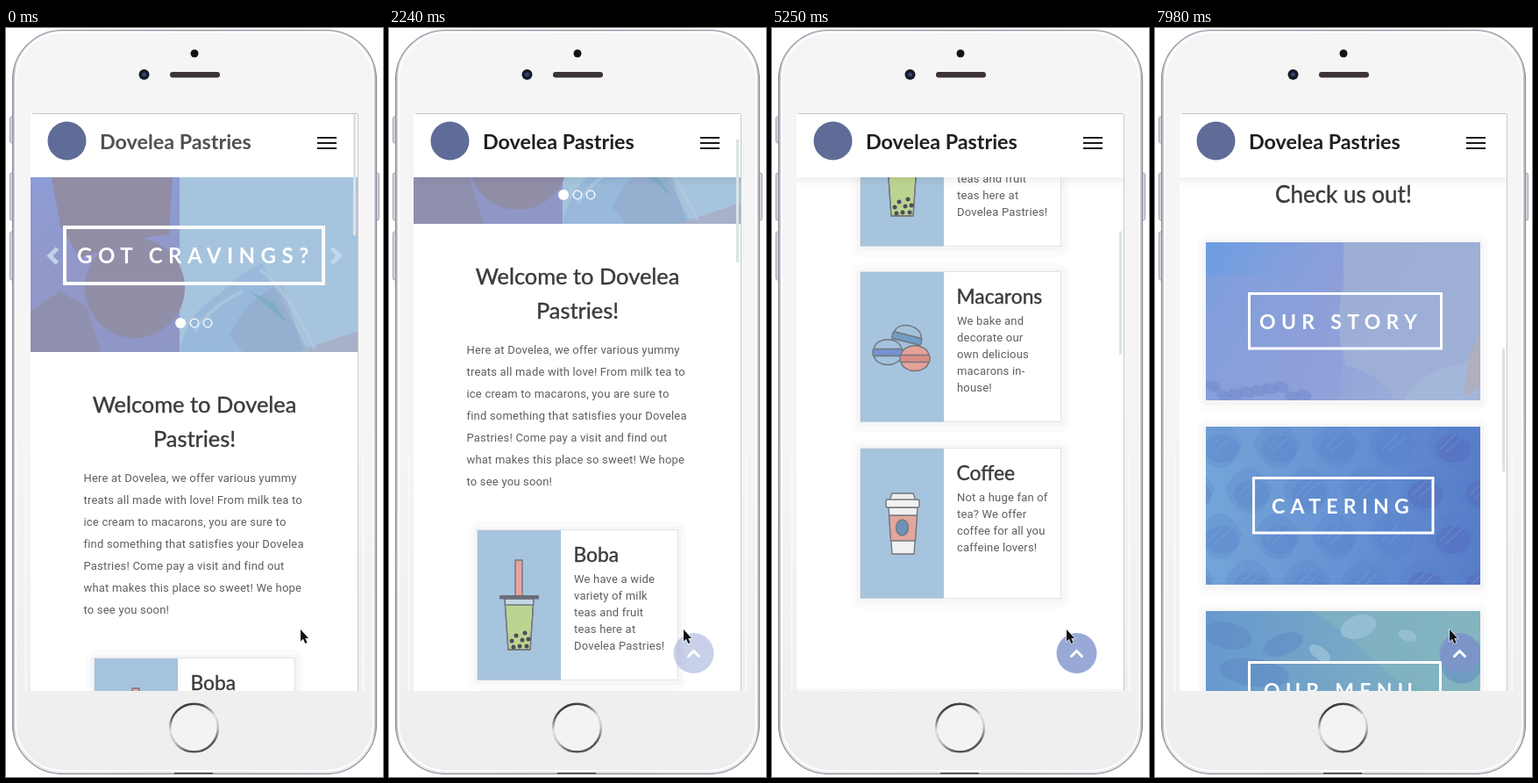
An HTML page for the animation above (8 s loop, 430 px wide and 853 px high).

```html
<!DOCTYPE html>
<html lang="en">
<head>
<meta charset="utf-8">
<title>Dessert shop on a phone</title>
<style>
  html, body { margin: 0; width: 100%; height: 100%; overflow: hidden; background: #fff; }
  svg { display: block; width: 430px; height: 853px; }
  text { white-space: pre; }
  .title { font-family: Lato, sans-serif; fill: #3a3a3f; }
  .medium { stroke: #3a3a3f; stroke-width: .4; }
  .body { font: 13px Roboto, sans-serif; letter-spacing: .2px; fill: #5e5e63; }
  .caps { font-family: Lato, sans-serif; font-weight: 700; fill: #fff; }
  .ink { stroke: #74767e; stroke-width: 1.4; stroke-linejoin: round; }
</style>
</head>
<body>
<svg viewBox="0 0 430 853">
  <defs>
    <linearGradient id="rim" x2="1" y2="0">
      <stop stop-color="#b4b4be"/><stop offset=".012" stop-color="#e6e6ec"/>
      <stop offset=".5" stop-color="#d6d6dc"/>
      <stop offset=".988" stop-color="#e6e6ec"/><stop offset="1" stop-color="#b4b4be"/>
    </linearGradient>
    <linearGradient id="face" x2="0" y2="1">
      <stop stop-color="#f5f5f5"/><stop offset=".5" stop-color="#f5f5f6"/><stop offset="1" stop-color="#eeeeee"/>
    </linearGradient>
    <linearGradient id="ring" x2=".35" y2="1">
      <stop stop-color="#222"/><stop offset=".25" stop-color="#555"/><stop offset=".5" stop-color="#e2e2e2"/>
      <stop offset=".75" stop-color="#c4c4c4"/><stop offset="1" stop-color="#555"/>
    </linearGradient>
    <linearGradient id="wall" x2="0" y2="1">
      <stop stop-color="#8c9cd6"/><stop offset=".5" stop-color="#9398c8"/><stop offset="1" stop-color="#8f97c6"/>
    </linearGradient>
    <linearGradient id="storyTone" x2="1" y2=".35">
      <stop stop-color="#6b9de2"/><stop offset=".3" stop-color="#839fdc"/>
      <stop offset=".52" stop-color="#8e9fd9"/><stop offset="1" stop-color="#9bb0d9"/>
    </linearGradient>
    <linearGradient id="cateringTone" x2="1" y2="0">
      <stop stop-color="#74a5d8"/><stop offset=".5" stop-color="#6792d3"/><stop offset="1" stop-color="#587dc9"/>
    </linearGradient>
    <linearGradient id="menuTone" x2="1" y2="0">
      <stop stop-color="#6799cf"/><stop offset=".5" stop-color="#76a7c5"/><stop offset="1" stop-color="#82b4bf"/>
    </linearGradient>
    <linearGradient id="shade" x2="0" y2="1">
      <stop stop-color="#000" stop-opacity=".055"/><stop offset="1" stop-color="#000" stop-opacity="0"/>
    </linearGradient>
    <clipPath id="screen"><rect x="28" y="97" width="374" height="658"/></clipPath>
    <clipPath id="heroClip"><rect x="28" y="170" width="374" height="199"/></clipPath>
    <clipPath id="tileClip"><rect width="313" height="180"/></clipPath>
  </defs>

  <g fill="#d9d9df" stroke="#a4a4b0">
    <rect x="4.500" y="101" width="5" height="30" rx="2"/>
    <rect x="4.500" y="165" width="5" height="54" rx="2"/>
    <rect x="4.500" y="232" width="5" height="55" rx="2"/>
    <rect x="420.500" y="165" width="5" height="54" rx="2"/>
  </g>
  <rect x="7.500" y="2.500" width="415" height="847" rx="57" fill="url(#rim)" stroke="#8f8f9c" stroke-width="1.200"/>
  <rect x="11" y="5" width="408" height="841" rx="54" fill="url(#face)" stroke="#fff" stroke-width="2"/>
  <path d="M60 849.500H370" stroke="#85858d"/>
  <path d="M192 849H236" stroke="#55555c" stroke-width="2"/>
  <path d="M22.500 485V755M407.500 485V755" stroke="#fafafa" stroke-width="2"/>
  <circle cx="215" cy="29" r="4.500" fill="#171315"/>
  <circle cx="157.500" cy="53" r="6" fill="#151a2b"/><circle cx="157.500" cy="53" r="2.500" fill="#35456b"/>
  <rect x="187" y="50" width="57" height="6.500" rx="3.200" fill="#3b3334"/>
  <circle cx="214.500" cy="797" r="27.300" fill="#f3f3f3" stroke="url(#ring)" stroke-width="2.600"/>

  <g clip-path="url(#screen)">
    <rect x="28" y="97" width="374" height="658" fill="#fff"/>
    <g id="page"></g>
    <rect id="shadow" x="28" y="170" width="374" height="11" fill="url(#shade)"/>
    <rect x="28" y="97" width="374" height="73" fill="#fff"/>
    <circle cx="69.500" cy="128.500" r="22" fill="#5f6c97"/>
    <text id="brand" class="title" x="107" y="138" font-size="23.300" font-weight="700">Dovelea Pastries</text>
    <path d="M355 125H377M355 131H377M355 137H377" stroke="#151515" stroke-width="2"/>
    <rect id="thumb" x="396" width="3" height="141" rx="1.500" fill="#d9e5e6"/>
    <path d="M30 97.500H401" stroke="#c6c6c8"/>
    <path d="M401.500 98V755" stroke="#c9c9cb"/>
    <g id="upButton">
      <circle cx="347.500" cy="712" r="23" fill="#7f94cc" opacity=".8"/>
      <path d="M341.500 715.500L347.500 709.500L353.500 715.500" fill="none" stroke="#fff" stroke-width="3" stroke-linecap="round"/>
    </g>
    <path d="M336 685V698.500L339 695.800L341.300 701L343.500 700L341.300 695H345Z" fill="#111" stroke="#fff" stroke-width="1.200" paint-order="stroke"/>
  </g>
</svg>
<script>
const byId = id => document.getElementById(id);
const range = n => [...Array(n).keys()];
const lines = (rows, x, y, step) =>
  rows.map((row, i) => `<text class="body" x="${x}" y="${y + i * step}">${row}</text>`).join('');
const heading = (text, y, size) =>
  `<text class="title medium" x="215" y="${y}" font-size="${size}" text-anchor="middle">${text}</text>`;
const halo = (w, h) =>
  `<rect x="-9" y="-9" width="${w + 18}" height="${h + 22}" rx="14" fill="#fbfbfb"/>
   <rect x="-4" y="-3" width="${w + 8}" height="${h + 9}" rx="5" fill="#f6f6f7"/>`;
const ellipses = (list, fill, opacity) => list.map(([x, y, rx, ry, turn = 0]) =>
  `<ellipse cx="${x}" cy="${y}" rx="${rx}" ry="${ry}" transform="rotate(${turn} ${x} ${y})" fill="${fill}" opacity="${opacity}"/>`).join('');

function hero() {
  return `<g clip-path="url(#heroClip)">
    <rect x="28" y="170" width="374" height="199" fill="#a6c4dd"/>
    <path d="M28 170H198V369H28Z" fill="url(#wall)"/>
    <path d="M52 170H190L186 235L150 240L84 262L62 225Z" fill="#918da4"/>
    <path d="M28 322L62 300L92 318L108 369H28Z" fill="#8f90ad"/>
    <path d="M198 369Q205 325 245 302Q265 280 292 268L345 369Z" fill="#98b9da"/>
    <path d="M255 350Q275 305 315 292L340 369H270Z" fill="#91a0c4" opacity=".4"/>
    <path d="M330 369L402 345V369Z" fill="#a7b1c9"/>
    <path d="M278 300L322 338L305 312Z" fill="#77aebd" opacity=".7"/>
    <path d="M215 345Q235 315 270 300M290 275Q322 300 352 365" fill="none" stroke="#b5cbe2" stroke-width="4" opacity=".6"/>
    <circle cx="147" cy="296" r="57" fill="#918ea8"/>
    <rect x="395" y="187" width="5" height="48" fill="#c3c7d2" opacity=".7"/>
  </g>
  <rect x="67" y="227" width="295" height="64" fill="none" stroke="#fff" stroke-width="4"/>
  <text class="caps" x="81" y="268" font-size="24" letter-spacing="6.5">GOT CRAVINGS?</text>
  <g fill="none" stroke="#c6ddef" stroke-width="5" opacity=".85">
    <path d="M58.500 251L50 259.500L58.500 268"/><path d="M371.500 251L380 259.500L371.500 268"/>
  </g>
  <circle cx="199" cy="336" r="6" fill="#fff"/>
  <g fill="none" stroke="#fff" stroke-width="1.300"><circle cx="215" cy="336" r="4.800"/><circle cx="230" cy="336" r="4.800"/></g>`;
}

function boba() {
  const pearls = [[55, 118], [45, 121], [52, 126], [59, 125], [40, 127], [42, 134], [49, 133], [57, 133]];
  return `<path class="ink" d="M32 79H65L61 137H36Z" fill="#c5d8e5"/>
    <path d="M33.500 86H63.500L60 136H37Z" fill="#bcd492"/>
    <path class="ink" d="M33 86H64M32 79L36 137H61L65 79" fill="none"/>
    <rect class="ink" x="44" y="35" width="8" height="41" fill="#e5a49c"/>
    <rect x="26" y="75" width="45" height="4.500" rx="1" fill="#686d77"/>
    ${ellipses(pearls.map(([x, y]) => [x, y, 2.5, 2.5]), '#4d4d59', 1)}`;
}

const macaron = (x, y, turn, shell, filling) =>
  `<g class="ink" stroke-width="1.200" transform="translate(${x} ${y}) rotate(${turn})" fill="${shell}">
    <path d="M-16 -3C-14 -18 14 -18 16 -3Z"/><path d="M-16 4C-13 18 13 18 16 4Z"/>
    <rect x="-17" y="-3.500" width="34" height="8" rx="2" fill="${filling}"/></g>`;

const macarons = () =>
  macaron(54, 76, 14, '#a3c2da', '#6f9cc4') +
  macaron(32, 92, 0, '#a3c2dc', '#7593d2') +
  macaron(63, 99, 0, '#e5a298', '#d88d86');

const coffee = () =>
  `<g class="ink"><path d="M33 68L37 121H62L66 68Z" fill="#f0f0f1"/>
    <path d="M33.500 77H65.500L63.500 106H35.500Z" fill="#e3a69c"/>
    <path d="M37 52H61L64 60H34Z" fill="#ededee"/>
    <rect x="30" y="59" width="38" height="9" rx="2" fill="#f2f2f3"/>
    <ellipse cx="48.500" cy="91" rx="7" ry="9" fill="#6b92b8"/></g>`;

const card = (y, name, rows, icon) =>
  `<g transform="translate(100 ${y})">${halo(230, 171)}
    <rect x=".5" y=".5" width="229" height="171" fill="#fff" stroke="#e3e3e6"/>
    <rect x="1" y="1" width="95" height="170.500" fill="#a6c4dd"/>${icon}
    <text class="title medium" x="110.500" y="37" font-size="22.800">${name}</text>
    ${lines(rows, 111, 61, 19)}</g>`;

const storyPhoto = () =>
  `<path d="M157 0H313V180H215Q200 150 160 140Q145 90 157 50Z" fill="#9fb1d6" opacity=".85"/>
   <path d="M0 40Q60 25 115 60T150 180H0Z" fill="#8c9fda" opacity=".5"/>
   <path d="M225 180Q245 145 295 138L313 120V180Z" fill="#a3b7da"/>
   <path d="M300 128L313 105V165L294 176Z" fill="#b3aeba" opacity=".8"/>
   ${ellipses(range(9).map(i => [8 + i * 13, 164 + i * 37 % 13, 9, 6, 20]), '#6f87cc', .5)}`;

const cateringPhoto = () => range(4).map(row => range(6).map(col => {
  const x = 15 + col * 66 - row % 2 * 32, y = 18 + row * 52;
  return `<path d="M${x - 27} ${y}Q${x} ${y - 46} ${x + 27} ${y}Q${x + 18} ${y + 31} ${x} ${y + 29}T${x - 27} ${y}Z" fill="#4f78c2" opacity=".2"/>
    <ellipse cx="${x + 3}" cy="${y + 7}" rx="20" ry="16" fill="${col > 3 ? '#5568b8' : '#5a86cb'}" opacity=".4"/>
    <path d="M${x - 12} ${y + 8}l18 -18M${x - 5} ${y + 11}l19 -17" stroke="#86acdf" stroke-width="1.500" opacity=".3"/>`;
}).join('')).join('');

const menuPhoto = () =>
  `<path d="M120 0H313V110Q230 95 190 55T120 0Z" fill="#86b6c0" opacity=".6"/>
   ${ellipses([[25, 28, 28, 15, 12], [88, 38, 24, 12, -20], [55, 70, 40, 16, 8], [292, 55, 25, 28]], '#5c88c4', .5)}
   ${ellipses([[174, 18, 21, 13, -18], [230, 28, 11, 6, 20], [130, 48, 14, 7, 35]], '#9fc4dd', .7)}`;

const tile = (y, tone, photo, [boxX, boxW], textX, label) =>
  `<g transform="translate(58 ${y})">${halo(313, 180)}
    <g clip-path="url(#tileClip)"><rect width="313" height="180" fill="url(#${tone})"/>${photo}</g>
    <rect x="${boxX}" y="58.500" width="${boxW}" height="62.500" fill="none" stroke="#fff" stroke-width="3"/>
    <text class="caps" x="${textX}" y="98.500" font-size="23" letter-spacing="6.3">${label}</text></g>`;

byId('page').innerHTML = hero() +
  heading('Welcome to Dovelea', 438, 25.4) + heading('Pastries!', 477, 25.4) +
  lines(['Here at Dovelea, we offer various yummy', 'treats all made with love! From milk tea to',
    'ice cream to macarons, you are sure to', 'find something that satisfies your Dovelea',
    'Pastries! Come pay a visit and find out', 'what makes this place so sweet! We hope',
    'to see you soon!'], 88.5, 517, 25) +
  card(717, 'Boba', ['We have a wide', 'variety of milk', 'teas and fruit', 'teas here at', 'Dovelea Pastries!'], boba()) +
  card(917, 'Macarons', ['We bake and', 'decorate our', 'own delicious', 'macarons in-', 'house!'], macarons()) +
  card(1118, 'Coffee', ['Not a huge fan of', 'tea? We offer', 'coffee for all you', 'caffeine lovers!'], coffee()) +
  '<path d="M28 1393.500H401" stroke="#f0f0f1"/>' + heading('Check us out!', 1469, 26) +
  tile(1514, 'storyTone', storyPhoto(), [49.5, 219], 61, 'OUR STORY') +
  tile(1724, 'cateringTone', cateringPhoto(), [54.5, 204.5], 75, 'CATERING') +
  tile(1934, 'menuTone', menuPhoto(), [49.5, 218], 66, 'OUR MENU');

// Time in ms, scroll in px, speed in px per ms.
const stops = [[0, 0, 0], [1150, 0, 0], [1820, 64, .16], [2940, 292, .17], [4270, 464, .14],
  [5250, 640, .23], [6860, 1138, .19], [7980, 1270, .08], [8000, 1271, .08]];

function scrollAt(t) {
  const i = stops.findIndex(stop => stop[0] > t);
  const [t0, y0, v0] = stops[i - 1], [t1, y1, v1] = stops[i];
  const span = t1 - t0, u = (t - t0) / span, w = 1 - u;
  return y0 * (1 + 2 * u) * w * w + v0 * span * u * w * w + y1 * u * u * (3 - 2 * u) - v1 * span * u * u * w;
}
const ramp = (t, from, to) => Math.min(1, Math.max(0, (t - from) / (to - from)));

function draw(now) {
  const t = Math.floor(now % 8000 / 70) * 70;
  const scroll = Math.round(scrollAt(t));
  const tone = Math.round(80 - 50 * ramp(t, 1150, 1500));
  byId('page').setAttribute('transform', `translate(0 ${-scroll})`);
  byId('thumb').setAttribute('y', 95.5 + scroll * .212);
  byId('brand').style.fill = `rgb(${tone} ${tone} ${tone + 5})`;
  byId('shadow').setAttribute('opacity', ramp(t, 1850, 2250));
  byId('upButton').setAttribute('opacity', ramp(t, 2030, 2430));
}
function tick() {
  draw(performance.now());
  requestAnimationFrame(tick);
}
tick();
</script>
</body>
</html>
```
